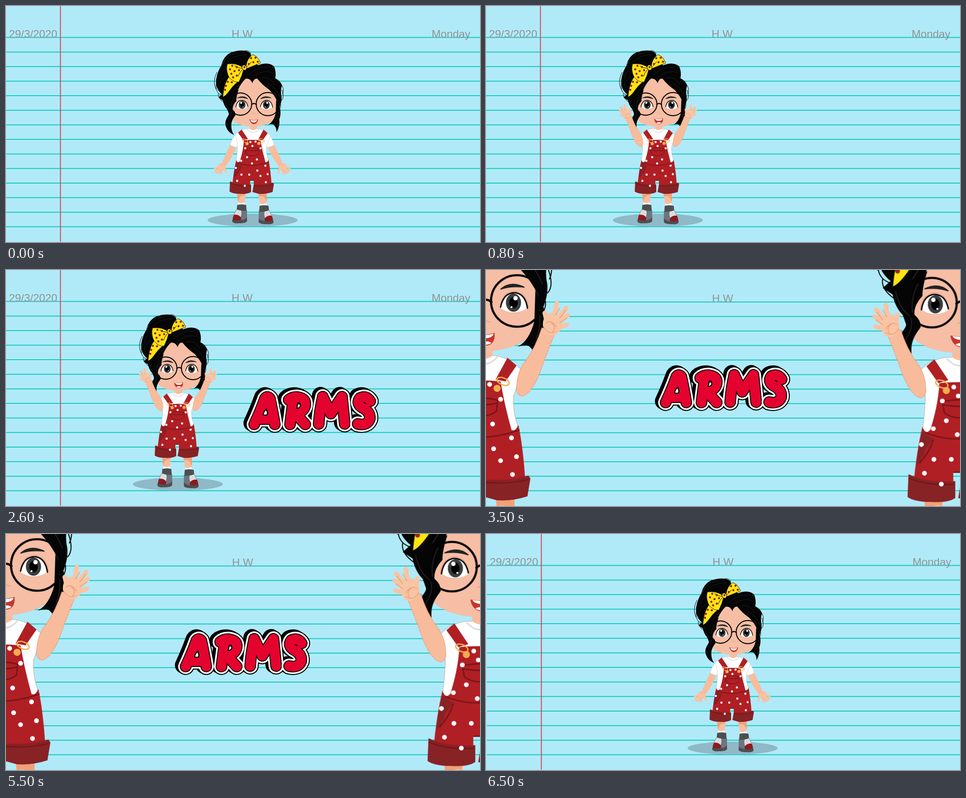
An HTML page without scripts for the animation above (6600 ms loop, 1058 by 529 pixels).

```html
<!DOCTYPE html>
<html lang="en">
<head>
<meta charset="utf-8">
<title>Body parts: arms</title>
<style>
html, body { margin: 0; width: 100%; height: 100%; overflow: hidden; background: #b0eaf8; }
svg { display: block; width: 100vw; height: 100vh; }
text { font: 24.3px "Liberation Sans", Arial, sans-serif; fill: #929496; }

.page, .header, .girl, .word, .rest, .blink, .wave, .calm, .big-wave, .big-blink {
  animation: 6.6s step-end infinite;
}
.page { animation-name: page; }
.header { animation-name: header; }
.girl { animation-name: slide; }
.word { animation-name: word; }
.rest { animation-name: rest; }
.blink { animation-name: blink; }
.wave { animation-name: wave; }
.calm { animation-name: calm; }
.big-wave { animation-name: big-wave; }
.big-blink { animation-name: big-blink; }

@keyframes page {
  0% { transform: none; }
  53.03% { transform: translate(1px, 1.2px) scaleY(.9977); }
  98.484%, 100% { transform: translate(2px, 0); }
}
@keyframes header {
  0% { visibility: visible; }
  53.03% { visibility: hidden; }
  98.484%, 100% { visibility: visible; }
}
@keyframes slide {
  0% { transform: none; }
  1.515% { transform: none; animation-timing-function: steps(7, start); }
  12.121% { transform: translate(-167px, 0); }
  98.484%, 100% { transform: none; }
}
@keyframes word {
  0% { visibility: hidden; transform: translate(1px, 0); }
  16.666% { visibility: visible; transform: translate(1px, 0); }
  53.03% { visibility: visible; transform: translate(-152px, -49px); }
  98.484%, 100% { visibility: hidden; transform: none; }
}
@keyframes rest {
  0%, 25.757%, 34.848%, 98.484%, 100% { visibility: visible; }
  12.121%, 30.303%, 39.393% { visibility: hidden; }
}
@keyframes blink {
  0%, 21.212%, 100% { visibility: hidden; }
  16.666% { visibility: visible; }
}
@keyframes wave {
  0%, 16.666%, 25.757%, 53.03%, 100% { visibility: hidden; }
  12.121%, 21.212%, 39.393% { visibility: visible; }
}
@keyframes calm {
  0%, 34.848%, 100% { visibility: hidden; }
  30.303% { visibility: visible; }
}
@keyframes big-wave {
  0%, 60.606%, 75.757%, 90.909%, 100% { visibility: hidden; }
  53.03%, 68.181%, 83.333% { visibility: visible; }
}
@keyframes big-blink {
  0%, 68.181%, 83.333%, 98.484%, 100% { visibility: hidden; }
  60.606%, 75.757%, 90.909% { visibility: visible; }
}

.skin { fill: #f8bc9d; }
.face { fill: #f6bea5; }
.fingers { fill: none; stroke: #f9c4a3; stroke-width: 4.7; stroke-linecap: round; }
.crease { fill: none; stroke: #eb9a76; stroke-width: .7; stroke-linecap: round; }
.red { fill: #b01f24; }
.cuff { fill: #872225; }
.seam { fill: none; stroke: #7a1519; stroke-width: 1.4; }
.white { fill: #fff; }
.hair { fill: #050505; }
.wisp { fill: none; stroke: #050505; stroke-width: 1; }
.strand { fill: none; stroke: #2c2c2c; stroke-width: .7; }
.bow { fill: #ffe414; stroke: #111; stroke-width: .9; }
.dots { fill: none; stroke-width: 4.8; stroke-linecap: round; }
.line { fill: none; stroke: #050505; stroke-linecap: round; }

.letter { fill: none; stroke-linecap: round; stroke-linejoin: round; }
.edge { stroke: #000; stroke-width: 38; }
.rim { stroke: #fff; stroke-width: 33.5; }
.ink { stroke: #000; stroke-width: 26; }
.fill { stroke: #e4022f; stroke-width: 22; }
.hole { fill: #fff; stroke: #000; stroke-width: 2.5; }
</style>
</head>
<body>
<svg viewBox="0 0 1058 529" preserveAspectRatio="none">
<defs>
  <g id="shoe">
    <path fill="#6d7680" d="M515 455Q508 466 506 478L507 484H535L538 478V458Z"/>
    <path fill="#dcdcdc" d="M516 455Q511 463 509 469Q517 468 524 473Q527 463 524 457Z"/>
    <path fill="#8c1a20" d="M509 468Q519 466 525 475L524 481H506Q506 473 509 468Z"/>
    <path fill="#4c4f51" d="M505 479Q515 482 525 480Q532 480 538 474V482Q536 487 520 487Q506 488 505 483ZM516 446Q526 443 536 446L537 459Q527 460 515 456Z"/>
  </g>

  <g id="body">
    <ellipse cx="550.5" cy="480" rx="100.5" ry="14.5" fill="#8fb9c7"/>
    <path class="skin" d="M516 416H535L533 444H518ZM563 416H582L581 446H567Z"/>
    <path fill="#f1a078" d="M516 418H535L533 425Q524 420 517 438ZM563 418H582V440Q577 422 564 427Z"/>
    <path class="white" d="M518 440Q525 443 533 440L534 448H518ZM567 443Q574 445 581 442L582 450H568Z"/>
    <use href="#shoe"/>
    <use href="#shoe" transform="translate(1102 2) scale(-1 1)"/>
    <path class="white" stroke="#bbb" stroke-width=".6" d="M538 275Q522 277 512 288Q516 300 517 316Q516 335 514 348Q518 353 523 353H578Q584 352 585 345Q580 330 581 316L590 290Q577 277 563 275Z"/>
    <path class="red" d="M531 301Q550 299 568 301Q572 325 579 350Q583 352 586 345Q591 370 593 404H553V391H545V404H505Q508 370 514 345Q517 354 522 348Q530 322 531 301Z"/>
    <path class="cuff" d="M500 393Q520 402 547 400V417Q540 422 522 421Q506 421 499 416ZM553 400Q577 402 596 396L598 399L595 417Q580 422 564 421L550 417Z"/>
    <path class="cuff" d="M514 350Q509 370 508 385Q514 378 518 366L525 358Z"/>
    <path class="red" d="M518 284L526 277L540 298L530 301ZM575 277L584 285L573 301L563 299Z"/>
    <path class="seam" d="M534 320Q550 316 565 320L564 331Q550 341 536 331ZM535 323Q550 326 565 323M517 351Q548 364 587 350M525 358Q521 371 511 382M500 397Q520 405 546 403M553 403Q577 405 596 400M545 391H553"/>
    <path class="dots" stroke="#fff" d="M545.5 305h0M557 304h0M550 314h0M534 319h0M568 319h0M538 339h0M560 344h0M525 347h0M549 353h0M579 358h0M513 363h0M561 369h0M525.5 378h0M543 378h0M568 381h0M584 377h0M516 392h0M533 403h0M580 395h0"/>
    <g fill="none" stroke="#f3ae50" stroke-width="1.3">
      <ellipse cx="533.5" cy="302" rx="6.5" ry="3.5" transform="rotate(22 533.5 302)"/>
      <ellipse cx="570.5" cy="301" rx="6.5" ry="3.5" transform="rotate(22 570.5 301)"/>
    </g>
    <g fill="#f3ab4f"><circle cx="538" cy="308.5" r="3.6"/><circle cx="564.5" cy="308" r="3.6"/></g>
    <path class="skin" d="M544 262H560V275Q552 281 544 275Z"/>
    <path fill="none" stroke="#ddd" stroke-width="1.5" d="M538 276Q552 291 565 276"/>
  </g>

  <g id="eye">
    <path fill="#e9a98f" d="M567 226Q570 209 583 209.5Q595 212 596.5 226Q581 238 567 226Z"/>
    <path class="white" d="M568 227Q571 211 583 212Q593 214 595 227Q581 236 568 227Z"/>
    <ellipse cx="581" cy="221.5" rx="7.6" ry="9.2" fill="#3a3d3d"/>
    <ellipse cx="581" cy="221.5" rx="4.3" ry="5.7"/>
    <circle class="white" cx="583" cy="217" r="2.2"/>
    <circle class="white" cx="579" cy="226" r="1"/>
    <path class="line" stroke-width="1.4" d="M568 226Q571 211 583 211.5Q593 213 595 227"/>
  </g>
  <g id="lid">
    <path fill="#efab8d" d="M567 226Q570 210 583 210Q595 213 596 226Q581 237 567 226Z"/>
    <path class="line" stroke-width="2" d="M567 226Q581 236 596 226"/>
  </g>
  <path id="brow" d="M568 208Q578 199 592 206Q579 204 568 208Z" fill="#222" stroke="#222" stroke-width="1"/>

  <g id="head">
    <path class="hair" d="M486 213L474 205L482 198Q467 186 469 165Q472 145 483 130Q487 104 520 100Q545 98 547 112Q557 124 562 133Q585 124 598 135Q604 148 601 162Q613 168 616 178Q612 190 615 203Q616 215 610 228Q612 240 600 250H500Q495 232 486 213Z"/>
    <path class="wisp" d="M471 148Q460 170 469 187M470 170Q465 195 482 200M474 196Q472 206 486 216M481 133Q485 112 505 103M530 101Q544 97 547 109M613 174Q623 185 617 198M616 188Q622 205 615 212M611 215Q617 225 607 236"/>
    <path class="strand" d="M486 130Q490 108 520 106M493 128Q506 109 538 109M476 165Q478 146 492 136M475 185Q474 167 490 158M540 155Q565 133 590 137M548 160Q573 142 594 149M570 161Q591 157 600 177M585 174Q602 181 610 203M494 197Q513 170 535 160M502 200Q511 182 525 171"/>
    <path class="face" d="M535 163Q545 161 550 173Q554 161 561 163Q573 178 588 188Q602 203 607 218Q608 228 607 234Q604 267 553 271Q512 270 499 248Q501 225 510 211Q519 177 535 163Z"/>
    <path class="hair" d="M483 203Q500 200 519 188Q514 203 514 213Q505 223 506 232Q513 238 512 245Q504 255 503 264Q502 280 509 289Q494 283 490 267Q488 257 496 246Q501 238 494 232Q484 222 483 203ZM603 209L611 225Q615 243 610 254Q612 268 604 283Q604 271 596 265Q591 264 585 266Q597 260 602 240Z"/>
    <path class="strand" d="M487 208Q490 225 502 234Q506 245 496 258M510 200Q502 215 504 230M494 262Q494 275 503 284M607 228Q609 246 604 257Q608 265 605 275"/>
    <path class="bow" d="M498 158Q486 174 484 204Q490 202 498 191Q505 180 517 170Z"/>
    <path class="bow" d="M529 138Q514 127 494 130Q490 145 498 160Q510 173 520 170Q527 156 530 143Z"/>
    <path class="bow" d="M536 134Q538 117 551 109Q563 113 568 128Q554 133 538 140Z"/>
    <ellipse class="bow" cx="532" cy="138" rx="5" ry="6" transform="rotate(-25 532 138)"/>
    <path class="wisp" stroke-width=".8" d="M528 140Q517 139 510 134M528 142Q521 149 518 158M538 136L548 125"/>
    <path class="dots" stroke="#9d2312" d="M547 117h0M557 116h0M562 125h0M552 126h0M542 130h0M532 137h0M505 134h0M515 137h0M500 142h0M510 146h0M520 144h0M503 152h0M515 156h0M507 160h0M495 170h0M504 171h0M491 179h0M489 188h0"/>
    <use href="#brow"/>
    <use href="#brow" transform="translate(1108) scale(-1 1)"/>
    <path class="crease" d="M549 241Q553 239 557 241"/>
  </g>
  <g id="glasses" class="line" stroke-width="2.2">
    <circle cx="523.5" cy="219.8" r="25"/>
    <circle cx="584.4" cy="219.8" r="26"/>
    <path d="M548 221Q553 216 559 221"/>
  </g>
  <g id="open-eyes">
    <use href="#eye"/><use href="#eye" transform="translate(1108) scale(-1 1)"/>
    <use href="#glasses"/>
  </g>
  <g id="shut-eyes">
    <use href="#lid"/><use href="#lid" transform="translate(1108) scale(-1 1)"/>
    <use href="#glasses"/>
  </g>

  <g id="smile">
    <path fill="#c4372e" d="M543 254Q553 258 563 254Q561 264 553 265Q546 264 543 254Z"/>
    <path class="white" d="M545 255.5Q553 258 561 255.5Q558 261 553 261Q548 261 545 255.5Z"/>
  </g>
  <g id="talk">
    <path fill="#c4372e" d="M542 253Q552 255 562 252Q563 264 553 265Q544 264 542 253Z"/>
    <path class="white" d="M544 253.5Q553 255 561 253Q560 257 553 257.5Q546 257 544 253.5ZM547 262Q553 259 559 262Q553 266 547 262Z"/>
  </g>
  <path id="hush" fill="#cb4438" d="M543 260Q549 256 553 257.500Q557 256 562 259Q553 264 543 260Z"/>

  <g id="arm-down">
    <path class="skin" d="M502 306Q494 325 482 351L491 358Q507 338 514 316Z"/>
    <ellipse class="skin" cx="482" cy="360" rx="9" ry="8"/>
    <path class="fingers" d="M478 358L466 364M478 361L467 371M480 363L473 375M483 363L480 375M486 360L491 372"/>
    <path class="crease" d="M474 363L467 368M476 367L470 374M481 367L477 375"/>
    <path class="white" stroke="#bbb" stroke-width=".6" d="M517 284Q506 291 500 311Q508 318 518 316Z"/>
    <path class="white" d="M516 285H519V315H516Z"/>
  </g>
  <g id="arm-up">
    <path class="skin" stroke="#ee9f79" stroke-width=".6" d="M478 250Q488 275 494 292Q502 313 512 316Q519 315 517 303Q516 290 508 280Q498 266 492 247Z"/>
    <path class="fingers" d="M480 239L477 222M477 239L467.500 227M475 241L466 234M477 247L467 244M486 244L489 232"/>
    <ellipse cx="481.5" cy="243" rx="9.5" ry="11.5" fill="#f9c4a3"/>
    <path class="crease" d="M474 237L468 229M478 234L474 227M474 242L467 237M477 246Q483 238 488 242M477 250Q485 255 490 246M483 241Q477 246 481 251"/>
  </g>
  <g id="arms-down"><use href="#arm-down"/><use href="#arm-down" transform="translate(1099) scale(-1 1)"/></g>
  <g id="arms-up"><use href="#arm-up"/><use href="#arm-up" transform="translate(1101.5) scale(-1 1)"/></g>

  <g id="rest"><use href="#arms-down"/><use href="#body"/><use href="#head"/><use href="#open-eyes"/><use href="#smile"/></g>
  <g id="blink"><use href="#arms-down"/><use href="#body"/><use href="#head"/><use href="#shut-eyes"/><use href="#smile"/></g>
  <g id="wave"><use href="#body"/><use href="#head"/><use href="#open-eyes"/><use href="#talk"/><use href="#arms-up"/></g>
  <g id="calm"><use href="#body"/><use href="#head"/><use href="#open-eyes"/><use href="#hush"/><use href="#arms-up"/></g>

  <path id="A" d="M553 346Q567 316 577 288Q582 281 588 288Q594 315 599 346M565 334H592"/>
  <path id="R" d="M630 291Q638 284 651 285Q669 288 667 303Q664 318 645 322L667 346M640 292L633 346"/>
  <path id="M" d="M697 345Q699 315 706 284L724 322L749 284Q752 315 755 345"/>
  <path id="S" d="M812 294Q803 280 789 287Q780 298 793 308Q813 317 811 334Q805 350 784 345"/>
</defs>

<rect width="1058" height="529" fill="#b0eaf8"/>
<g class="page">
  <path stroke="#12c8bd" stroke-width="1058" stroke-dasharray="2 30.63" d="M529 69.6V497"/>
  <text x="503.5" y="70.5">H.W</text>
  <g class="header">
    <text x="6.5" y="70.5">29/3/2020</text>
    <text x="950" y="70.5">Monday</text>
    <path stroke="#d8404f" stroke-width="2" d="M121.5 0V528"/>
  </g>
</g>

<g class="girl">
  <use class="rest" href="#rest"/>
  <use class="blink" href="#blink"/>
  <use class="wave" href="#wave"/>
  <use class="calm" href="#calm"/>
</g>

<g class="big-wave">
  <use href="#wave" transform="translate(-1228.5 -418.5) scale(2.22)"/>
  <use href="#wave" transform="translate(-166.9 -414.8) scale(2.22)"/>
</g>
<g class="big-blink">
  <use href="#blink" transform="translate(-1228.5 -418.5) scale(2.22)"/>
  <use href="#blink" transform="translate(-166.9 -414.8) scale(2.22)"/>
</g>

<g class="word" role="img" aria-label="ARMS">
  <g class="letter edge">
    <g transform="translate(-5 -3)"><use href="#A"/><use href="#R"/><use href="#M"/><use href="#S"/></g>
    <use href="#A"/><use href="#R"/><use href="#M"/><use href="#S"/>
  </g>
  <g class="letter">
    <use class="rim" href="#A"/><use class="ink" href="#A"/><use class="fill" href="#A"/>
    <use class="rim" href="#R"/><use class="ink" href="#R"/><use class="fill" href="#R"/>
    <use class="rim" href="#M"/><use class="ink" href="#M"/><use class="fill" href="#M"/>
    <use class="rim" href="#S"/><use class="ink" href="#S"/><use class="fill" href="#S"/>
  </g>
  <path class="hole" d="M579 313Q584 317 582 324Q577 327 573 324Q574 317 579 313ZM650 300Q657 299 656 305Q654 310 648 310Z"/>
</g>
</svg>
</body>
</html>
```
